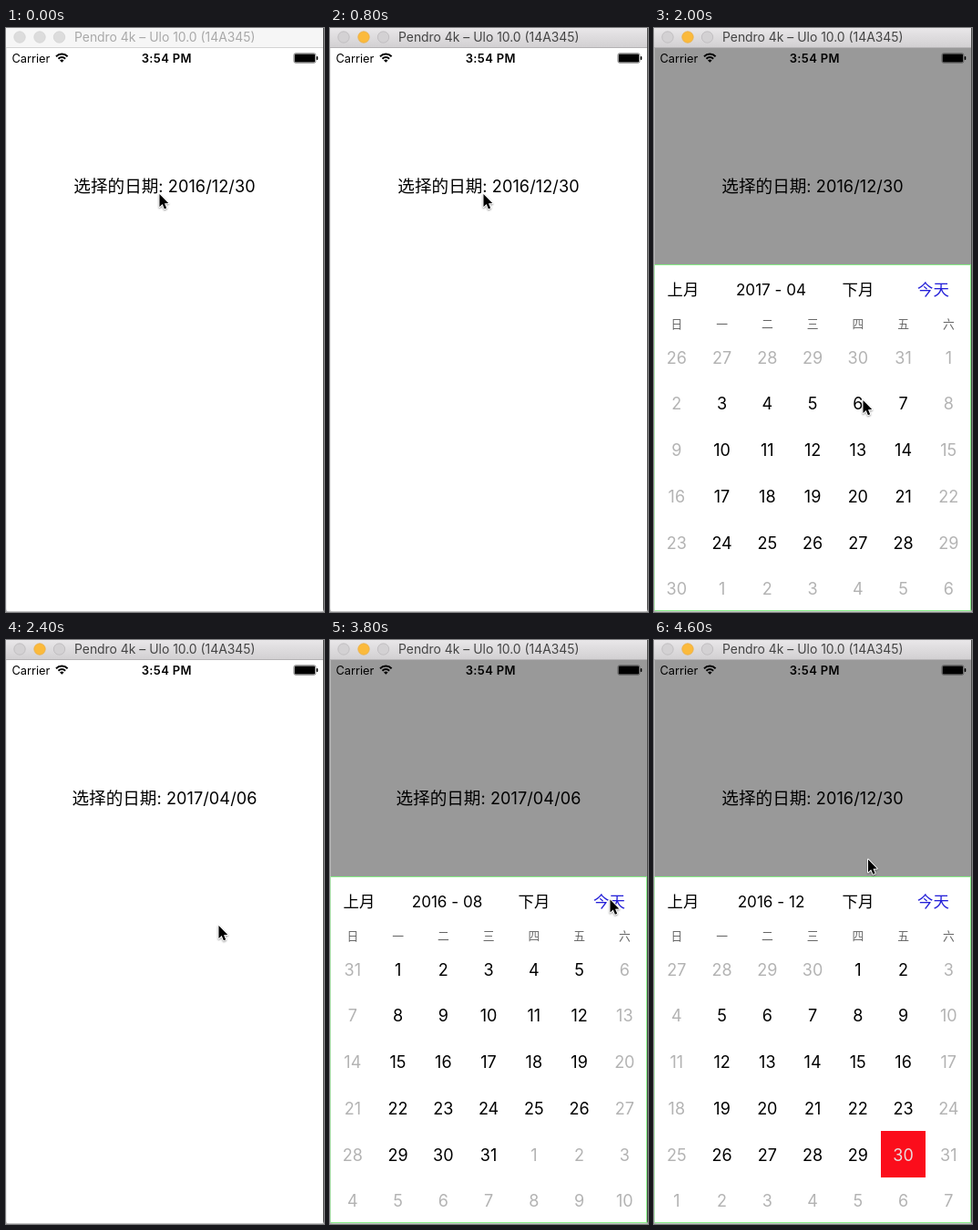
These frames come from a looping animation (349 px wide and 640 px high, 4.8 s). An HTML page with a canvas:

```html
<!DOCTYPE html>
<html lang="zh-CN">
<head>
<meta charset="utf-8">
<title>Date picker</title>
<style>
html, body { margin: 0; width: 100%; height: 100%; overflow: hidden; background: #fff; }
canvas { display: block; width: 349px; height: 640px; }
</style>
</head>
<body>
<canvas id="stage" width="349" height="640"></canvas>
<script>
const ctx = document.getElementById('stage').getContext('2d');
const W = 349, H = 640, LOOP = 4800, STEP = 200;
const LATIN = 'Inter, "Liberation Sans", sans-serif';
const HAN = '"Noto Sans CJK SC", "Noto Sans CJK", sans-serif';
const WEEK = [...'日一二三四五六'];
const TODAY = Date.UTC(2016, 11, 30);
const SLIDE = 190;

// Each entry holds until the next: start time, then the values that change.
const timeline = [
  [0, { active: false, open: false, date: '2016/12/30', x: 168, y: 182, drop: 0 }],
  [200, { active: true, open: true, month: [2016, 12] }],
  [600, { drop: SLIDE }],
  [800, { open: false, drop: 0 }],
  [1000, { open: true }],
  [1200, { x: 213.5, y: 285 }],
  [1400, { month: [2017, 1] }],
  [1600, { month: [2017, 2] }],
  [1800, { month: [2017, 4], x: 217, y: 354 }],
  [2000, { x: 229, y: 408 }],
  [2200, { date: '2017/04/06', drop: SLIDE }],
  [2400, { open: false, drop: 0, x: 233, y: 313 }],
  [2600, { x: 150, y: 285 }],
  [2800, { open: true, month: [2016, 12], x: 75, y: 259 }],
  [3000, { x: 28, y: 285.5 }],
  [3200, { month: [2016, 10] }],
  [3400, { month: [2016, 8] }],
  [3600, { x: 301, y: 309 }],
  [3800, { x: 307, y: 284.5 }],
  [4000, { date: '2016/12/30', drop: SLIDE }],
  [4200, { open: false, drop: 0 }],
  [4400, { x: 234.5, y: 240.5 }],
  [4600, { open: true, month: [2016, 12] }]
];

function stateAt(t) {
  const s = {};
  for (const [start, change] of timeline) if (start <= t) Object.assign(s, change);
  return s;
}

function rect(color, x, y, w, h) {
  ctx.fillStyle = color;
  ctx.fillRect(x, y, w, h);
}

// Draws text whose capitals or ideographs are centred on y.
function text(str, x, y, size, { font = LATIN, color = '#000', align = 'center', weight = 400, gap = 0 } = {}) {
  ctx.font = `${weight} ${size}px ${font}`;
  ctx.letterSpacing = gap + 'px';
  ctx.fillStyle = color;
  ctx.textAlign = align;
  ctx.fillText(str, x, y + size * (font === HAN ? 0.38 : 0.364));
  ctx.letterSpacing = '0px';
}

function dot(x, fill, edge) {
  ctx.beginPath();
  ctx.arc(x, 10, 6.2, 0, Math.PI * 2);
  ctx.fillStyle = fill;
  ctx.fill();
  ctx.strokeStyle = edge;
  ctx.lineWidth = 0.8;
  ctx.stroke();
}

function titleBar(active) {
  if (active) {
    const g = ctx.createLinearGradient(0, 0, 0, 21);
    g.addColorStop(0, '#e9e7e9');
    g.addColorStop(1, '#d2d0d2');
    rect(g, 0, 0, W, 21);
  } else {
    rect('#f6f6f6', 0, 0, W, 21);
  }
  rect(active ? '#b4b2b4' : '#d4d4d4', 0, 21, W, 1);
  for (const x of [15, 37, 58.5]) {
    if (!active) dot(x, '#dcdcdc', '#d4d4d4');
    else if (x === 37) dot(x, '#fbba3c', '#e9ae48');
    else dot(x, '#d3d1d3', '#bbb9bb');
  }
  text('Pendro 4k – Ulo 10.0 (14A345)', 75, 10, 13.9,
    { align: 'left', color: active ? '#444' : '#a9a9a9' });
}

function statusBar() {
  text('Carrier', 6.5, 33, 12.8, { align: 'left' });
  text('3:54 PM', 176.3, 33, 13, { weight: 600, gap: 0.35 });

  const a = Math.PI * 0.25;
  ctx.strokeStyle = '#000';
  ctx.lineWidth = 2;
  for (const r of [5.4, 8.9]) {
    ctx.beginPath();
    ctx.arc(61.3, 37.5, r, -Math.PI / 2 - a, -Math.PI / 2 + a);
    ctx.stroke();
  }
  ctx.fillStyle = '#000';
  ctx.beginPath();
  ctx.moveTo(61.3, 37.8);
  ctx.arc(61.3, 37.8, 3.2, -Math.PI / 2 - a, -Math.PI / 2 + a);
  ctx.fill();

  ctx.strokeStyle = '#444';
  ctx.lineWidth = 0.6;
  ctx.beginPath();
  ctx.roundRect(315.9, 27.7, 24, 10.6, 2);
  ctx.stroke();
  ctx.beginPath();
  ctx.roundRect(316.7, 28.5, 22.4, 9, 1.2);
  ctx.fill();
  ctx.beginPath();
  ctx.roundRect(340.7, 31, 1.6, 4, 0.8);
  ctx.fill();
}

function dateLabel(date) {
  const han = '选择的日期', latin = ': ' + date, gap = 0.08;
  ctx.font = `18.6px ${HAN}`;
  const left = ctx.measureText(han).width;
  ctx.font = `18.1px ${LATIN}`;
  ctx.letterSpacing = gap + 'px';
  const x = 174 - (left + ctx.measureText(latin).width) / 2;
  text(han, x, 173, 18.6, { font: HAN, align: 'left' });
  text(latin, x + left, 173, 18.1, { align: 'left', gap });
}

function calendar([year, month], drop) {
  ctx.save();
  ctx.beginPath();
  ctx.rect(0, 22, W, H - 22);
  ctx.clip();
  ctx.translate(0, drop);
  rect('#fff', 0, 259, 348, 381);
  ctx.strokeStyle = '#86ee86';
  ctx.lineWidth = 1;
  ctx.strokeRect(0.5, 259.5, 347, 379);

  text('上月', 32, 286, 17.4, { font: HAN });
  text('下月', 224, 286, 17.4, { font: HAN });
  text('今天', 306.5, 286, 17.4, { font: HAN, color: '#2420d8' });
  text(`${year} - ${String(month).padStart(2, '0')}`, 128.5, 286.5, 17.1);

  const colX = i => 24.8 + i * 49.75;
  WEEK.forEach((d, i) => text(d, colX(i), 324.5, 12.8, { font: HAN, color: '#666' }));

  const lead = new Date(Date.UTC(year, month - 1, 1)).getUTCDay();
  for (let i = 0; i < 42; i++) {
    const day = new Date(Date.UTC(year, month - 1, 1 - lead + i));
    const col = i % 7, row = Math.floor(i / 7);
    const x = colX(col), y = 361 + row * 50.75;
    const muted = col === 0 || col === 6 || day.getUTCMonth() !== month - 1;
    const today = day.getTime() === TODAY;
    if (today) rect('#fb0d1b', 249, 538, 49, 51);
    text(day.getUTCDate(), x, y, 18, { color: today ? '#e8dcdc' : muted ? '#b3b3b3' : '#000' });
  }
  ctx.restore();
}

function frameEdges() {
  rect('#d8d8d8', 0, 22, 0.5, H - 22);
  rect('#4a4a4a', 348, 0, 1, H);
  rect('#c4c4c4', 0, 639, W, 1);
  ctx.fillStyle = '#b0b0b0';
  for (const [x, dir] of [[0, 1], [W, -1]]) {
    ctx.beginPath();
    ctx.moveTo(x, H - 4);
    ctx.quadraticCurveTo(x, H, x + 4 * dir, H);
    ctx.lineTo(x, H);
    ctx.fill();
  }
}

function pointer(x, y) {
  ctx.save();
  ctx.translate(x, y);
  ctx.scale(0.95, 0.95);
  ctx.beginPath();
  ctx.moveTo(0.5, 0);
  for (const [px, py] of [[0.5, 14.8], [3.9, 11.6], [6.2, 17], [8.6, 16], [6.3, 10.8], [10.8, 10.6]]) {
    ctx.lineTo(px, py);
  }
  ctx.closePath();
  ctx.shadowColor = 'rgba(0,0,0,.4)';
  ctx.shadowBlur = 2;
  ctx.shadowOffsetY = 1;
  ctx.strokeStyle = '#fff';
  ctx.lineWidth = 2;
  ctx.lineJoin = 'round';
  ctx.stroke();
  ctx.shadowColor = 'transparent';
  ctx.fillStyle = '#000';
  ctx.fill();
  ctx.restore();
}

function draw(t) {
  const s = stateAt(t);
  rect(s.open ? '#999' : '#fff', 0, 0, W, H);
  titleBar(s.active);
  statusBar();
  dateLabel(s.date);
  if (s.open) calendar(s.month, s.drop);
  frameEdges();
  pointer(s.x, s.y);
}

const begin = performance.now();
function tick() {
  const t = (performance.now() - begin) % LOOP;
  draw(Math.floor(t / STEP) * STEP);
  requestAnimationFrame(tick);
}
tick();
</script>
</body>
</html>
```
